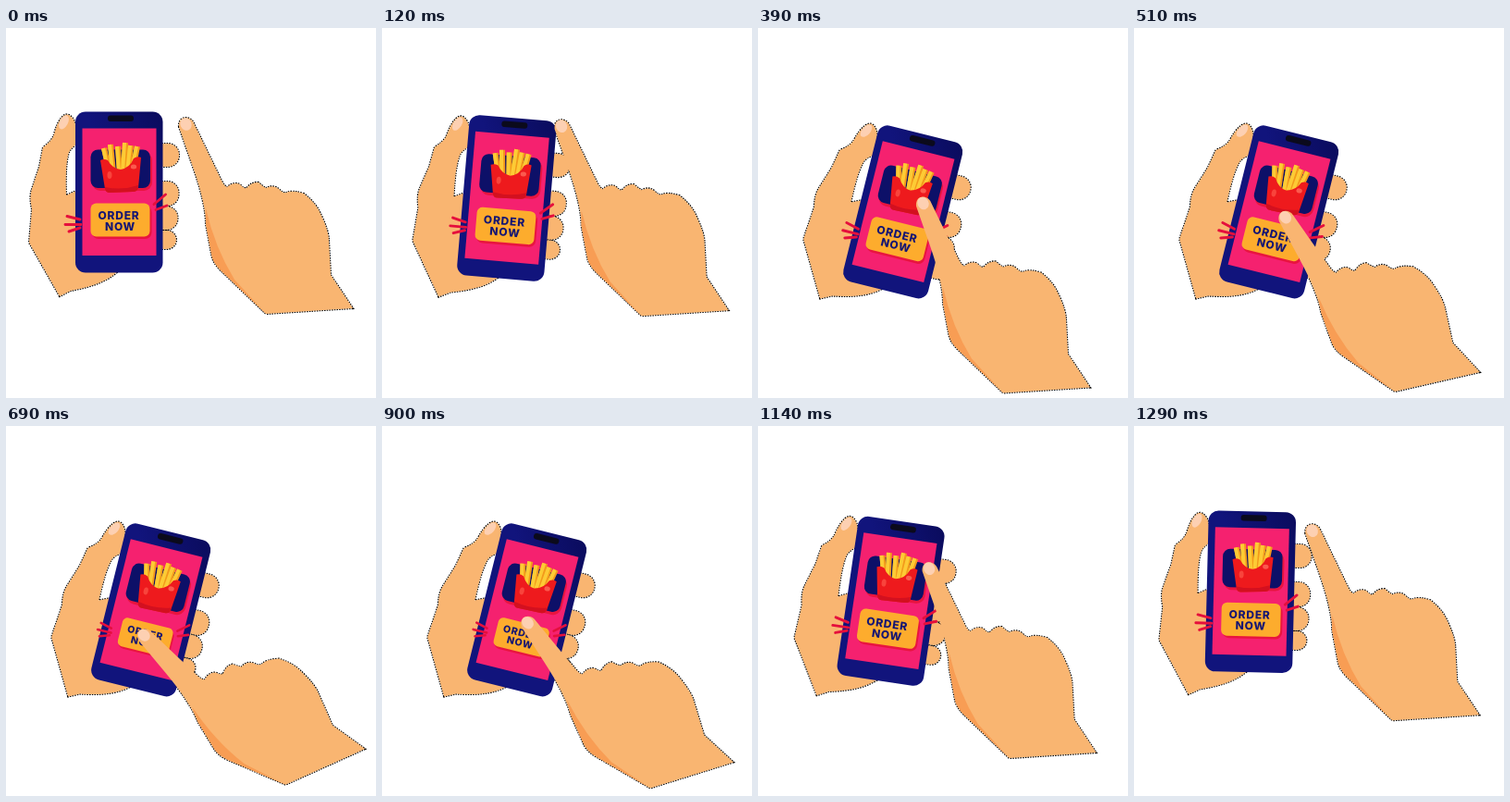
Animation of 400x400 px, one loop 1.32 s. Source, as an HTML page:

```html
<!DOCTYPE html>
<html lang="en">
<head>
<meta charset="utf-8">
<style>
  html, body { margin: 0; width: 100%; height: 100%; overflow: hidden; background: #fff; }
  svg { display: block; width: 100vw; height: 100vh; }
  .outline { fill: none; stroke: #000; stroke-width: 2.1; stroke-dasharray: 1.5 1.2; }
  .skin { fill: #f9b571; }
  .sparks { fill: none; stroke: #e50f3c; stroke-width: 2.9; stroke-linecap: round; }
  .fries { fill: none; stroke: #f29a1b; stroke-width: 6; }
  .fries.front { stroke: #fdcb35; stroke-width: 4; }
  text { font: 800 12px Inter, sans-serif; fill: #151673; text-anchor: middle; letter-spacing: .8px; }
</style>
</head>
<body>
<svg viewBox="0 0 400 400">
  <defs>
    <g id="holder">
      <path d="M58 290L25 232L28 196Q25 182 28 174L36 150L40 129Q50 122 52 115Q55 103 60 97Q64 92 68 94Q75 98 76 110V126Q68 131 67 138Q64 150 65 181L76 176H120V264C105 277 85 281 70 284Z"/>
      <rect x="140" y="125" width="47" height="25" rx="12"/>
      <rect x="140" y="166" width="46.5" height="26" rx="12"/>
      <rect x="140" y="193" width="45.5" height="25" rx="12"/>
      <rect x="140" y="219" width="44" height="20" rx="10"/>
    </g>
    <path id="pointer" d="M187 107C186 94 200 95 203 103L217 132L233 165Q236 171 239 172Q246 166 253 169Q257 174 260 173Q266 166 273 167Q277 171 281 173Q289 169 295 174Q299 179 303 178Q309 175 322 179Q336 190 341 203Q349 220 349 230L351 267L375 303L281 309L232 262Q223 253 222 244L216 212Q216 190 202 150Z"/>
    <path id="sticks" d="M105 130L111 156M112 126L115 156M120 128L122 156M128 124L126 156M134 127L131 156M141 128L136 154"/>
    <linearGradient id="body" x1="0" y1="1" x2="1" y2="0">
      <stop offset=".55" stop-color="#11147c"/>
      <stop offset="1" stop-color="#0a0b5c"/>
    </linearGradient>
  </defs>

  <g class="left outline"><use href="#holder"/></g>
  <g class="right outline"><use href="#pointer"/></g>

  <g class="left">
    <use href="#holder" class="skin"/>
    <ellipse cx="62.5" cy="102" rx="4.5" ry="8" transform="rotate(28 62.5 102)" fill="#fdd0b2"/>
    <rect x="75" y="90.5" width="94.5" height="174" rx="11" fill="url(#body)"/>
    <rect x="110" y="94.5" width="28" height="6.5" rx="3" fill="#0b0a1c"/>
    <path d="M82.5 108.5H162.5V246H82.5Z" fill="#f5216f"/>

    <rect x="93" y="134" width="65" height="42" rx="9" fill="#e9143f"/>
    <rect x="91.5" y="131.5" width="64.5" height="41.5" rx="8" fill="#0d1068"/>
    <use href="#sticks" class="fries" x="1"/>
    <use href="#sticks" class="fries front"/>
    <path d="M102 143Q106 141 110 143Q115 152 124 153Q134 151 138 141Q142 138 146 140L143 173Q142 177 137 177L112 178Q108 178 107 174Z" fill="#ee1a1d"/>
    <path d="M107 172Q125 176 143 170L143 173Q142 177 137 177L112 178Q108 178 107 174Z" fill="#d3101f"/>
    <ellipse cx="138" cy="150" rx="3.2" ry="2.5" fill="#fb5a4e"/>
    <ellipse cx="112" cy="159" rx="2.5" ry="4" fill="#f8443c"/>

    <g id="button">
      <path class="sparks" d="M66 203.5L80 207M64 212.5H81M68 220L80 216M160 190.5L172.5 180M162 196.5L174 192"/>
      <rect x="93" y="192" width="64.5" height="36" rx="7" fill="#e9143f"/>
      <rect x="91.5" y="189.5" width="64" height="36" rx="6" fill="#fdac2d"/>
      <text x="122" y="206.5">ORDER</text>
      <text x="123.5" y="218.5">NOW</text>
    </g>
  </g>

  <g class="right">
    <use href="#pointer" class="skin"/>
    <path d="M216 195Q226 238 247 272L281 309L232 262Q223 253 222 244L216 212Z" fill="#f89d54"/>
    <ellipse cx="194.5" cy="104" rx="6" ry="7" transform="rotate(-25 194.5 104)" fill="#fdd0b2"/>
  </g>
</svg>
<script>
  const LOOP = 1320, STEP = 30;
  const ramp = (t, from, to) => Math.min(1, Math.max(0, (t - from) / (to - from)));
  const pulse = (t, from, to) => Math.sin(Math.PI * ramp(t, from, to));
  const move = (selector, transform) =>
    document.querySelectorAll(selector).forEach(el => el.setAttribute("transform", transform));

  function draw(now) {
    const t = Math.floor((now % LOOP) / STEP) * STEP;
    const tilt = 14 * (ramp(t, 40, 270) - ramp(t, 1020, 1320));
    const reach = ramp(t, 113, 388) - ramp(t, 1010, 1324);
    const turn = -21 * pulse(t, 420, 1040);
    const press = 1 - .16 * pulse(t, 560, 1020);

    move(".left", `rotate(${tilt} 52.5 328.5)`);
    move(".right", `translate(${-16 * reach} ${85.5 * reach}) rotate(${turn} 281 203)`);
    move("#button", `translate(124 208) scale(${press}) translate(-124 -208)`);
    requestAnimationFrame(draw);
  }
  requestAnimationFrame(draw);
</script>
</body>
</html>
```
